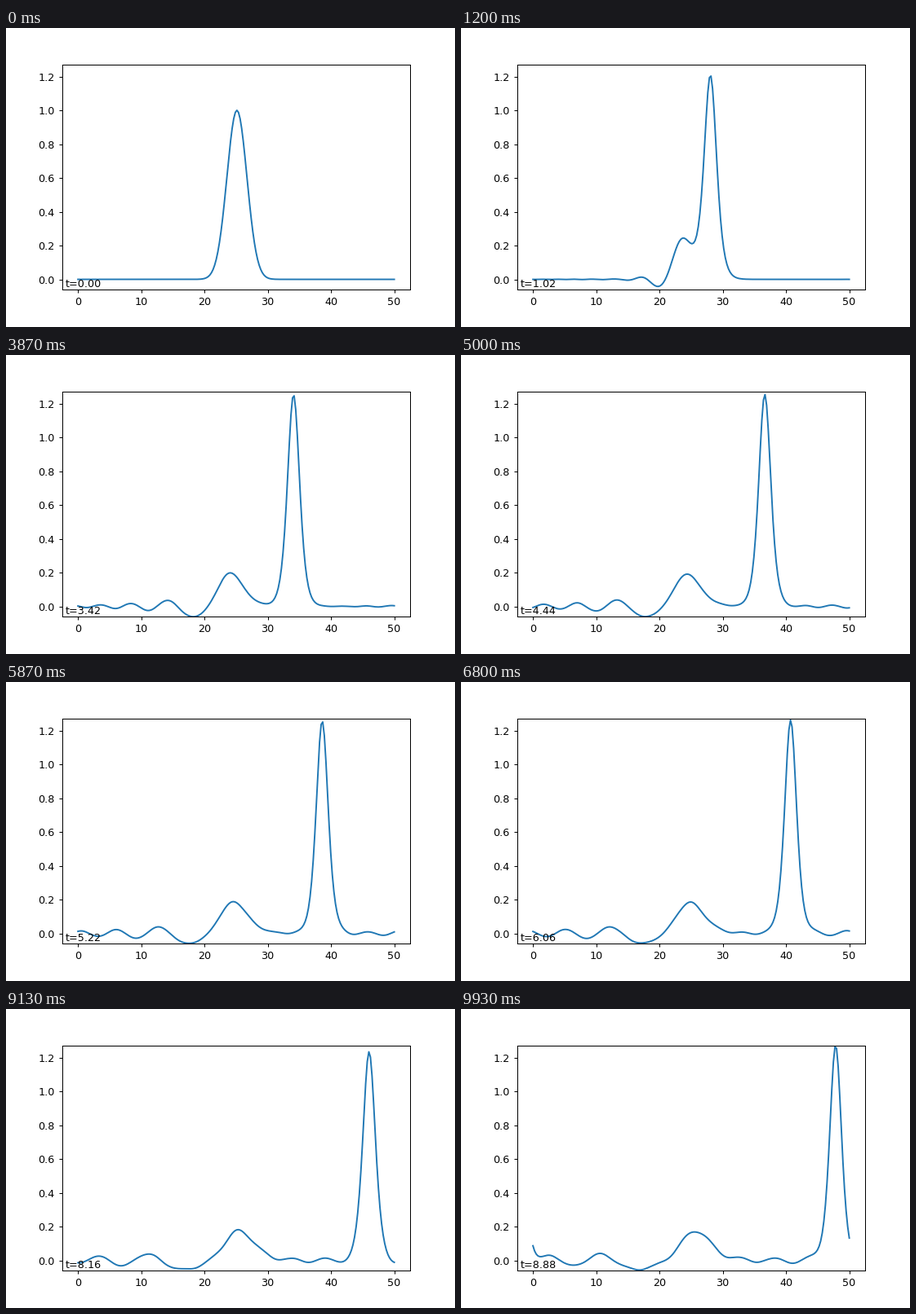
These frames come from a looping animation (550 by 367 pixels, 9.99 s). A matplotlib script:

```python
import numpy as np
import matplotlib.pyplot as plt
from matplotlib.animation import FuncAnimation

# Korteweg-de Vries equation u_t + 6 u u_x + u_xxx = 0 on a periodic domain
LENGTH, POINTS = 50, 200
FRAMES, LOOP_MS = 150, 9990
FRAME_DT, SUBSTEPS = 0.06, 30

x = np.linspace(0, LENGTH, POINTS)
k = 2 * np.pi * np.fft.rfftfreq(POINTS, d=LENGTH / POINTS)


def nonlinear(v):
    u = np.fft.irfft(v, POINTS)
    return -3j * k * np.fft.rfft(u * u)


def solve(u0, count):
    """Integrating-factor RK4 in Fourier space; returns one row per frame time."""
    dt = FRAME_DT / SUBSTEPS
    half = np.exp(0.5j * k**3 * dt)
    full = half**2
    v = np.fft.rfft(u0)
    states = [u0]
    for _ in range(count - 1):
        for _ in range(SUBSTEPS):
            a = dt * nonlinear(v)
            b = dt * nonlinear(half * (v + a / 2))
            c = dt * nonlinear(half * v + b / 2)
            d = dt * nonlinear(full * v + half * c)
            v = full * v + (full * a + 2 * half * (b + c) + d) / 6
        states.append(np.fft.irfft(v, POINTS))
    return np.array(states)


# Gaussian pulse centred on the middle grid point
states = solve(np.exp(-(x - x[POINTS // 2]) ** 2 / 5), FRAMES - 1)

# A 6 inch wide figure scaled to 550 pixels at 100 dpi
scale = 5.5 / 6
plt.rcParams.update({
    "font.family": "DejaVu Sans",
    "font.size": 10 * scale,
    "axes.linewidth": 0.8 * scale,
    "lines.linewidth": 1.5 * scale,
})
for axis in ("xtick", "ytick"):
    plt.rcParams.update({
        f"{axis}.major.size": 3.5 * scale,
        f"{axis}.major.width": 0.8 * scale,
        f"{axis}.major.pad": 3.5 * scale,
    })

fig, ax = plt.subplots(figsize=(5.5, 3.67), dpi=100)
fig.subplots_adjust(left=0.125, right=0.9, bottom=0.125, top=0.8783)
ax.set_xlim(-2.5, 52.5)
ax.set_ylim(-0.0607, 1.2715)
ax.set_xticks(range(0, 51, 10))
ax.set_yticks(np.arange(7) * 0.2)

line, = ax.plot(x, states[0], color="C0")
label = ax.text(0.01, 0.01, "t=0.00", transform=ax.transAxes)


def update(frame):
    # The opening state is held for two frames
    step = max(frame - 1, 0)
    line.set_ydata(states[step])
    label.set_text(f"t={step * FRAME_DT:.2f}")
    return line, label


anim = FuncAnimation(fig, update, frames=FRAMES, interval=LOOP_MS / FRAMES,
                     repeat=True)

plt.show()
```
